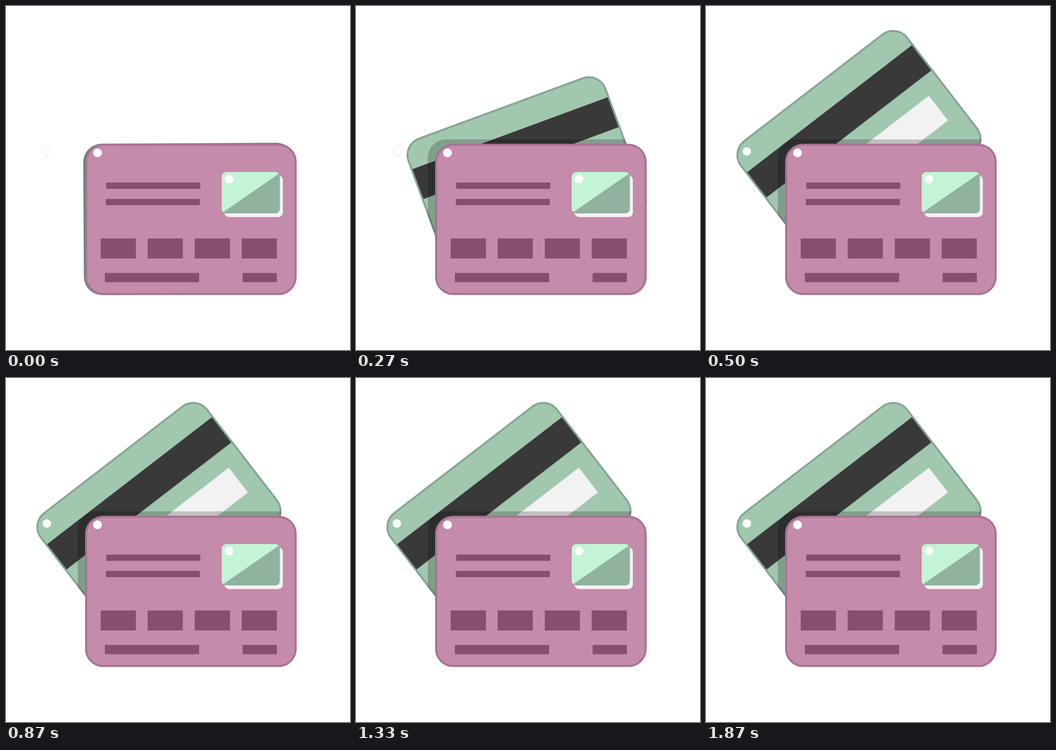
Recreate the animation shown at these times as an HTML page without scripts. Size 748 by 748 pixels, loop 1.91 s.

```html
<!DOCTYPE html>
<html lang="en">
<head>
<meta charset="utf-8">
<title>Cards</title>
<style>
  html, body { margin: 0; width: 100%; height: 100%; overflow: hidden; background: #fff; }
  svg { display: block; width: 100vw; height: 100vh; }
  .swing { animation: swing 1910ms -3.4ms infinite; }
  /* swings out in 15 even steps over 500 ms, then rests */
  @keyframes swing {
    0% {
      transform: translate(230.9px, 493.9px) rotate(-.31deg);
      animation-timing-function: steps(15, end);
    }
    26.178%, 100% { transform: translate(217.8px, 432.9px) rotate(-37.63deg); }
  }
  .dot { fill: #fff; }
  .ink { fill: #864f6d; }
  .pale { fill: #f2f2f2; }
</style>
</head>
<body>
<svg viewBox="0 0 748 748">
  <defs>
    <clipPath id="backShape">
      <rect class="swing" x="-62" y="-194.5" width="460" height="329" rx="40"/>
    </clipPath>
  </defs>

  <circle cx="88.8" cy="316.3" r="9" fill="none" stroke="#c795ae"/>

  <!-- back card, drawn around its pivot -->
  <g class="swing">
    <rect x="-60" y="-192.5" width="456" height="325" rx="38" fill="#a1c7ae" stroke="#84a391" stroke-width="4"/>
    <rect x="-58" y="-135" width="452" height="69.3" fill="#393939"/>
    <rect class="pale" x="108" y="-25.5" width="248.6" height="68"/>
  </g>
  <g clip-path="url(#backShape)">
    <rect x="156" y="290" width="484" height="350" rx="40" opacity=".2"/>
  </g>
  <circle class="dot" cx="88.8" cy="316.3" r="9.2"/>

  <!-- front card -->
  <rect x="174.2" y="301.7" width="455.6" height="324.6" rx="37" fill="#c48bab" stroke="#a87393" stroke-width="4.4"/>
  <circle class="dot" cx="199" cy="319.2" r="9.5"/>
  <g class="ink">
    <rect x="218" y="384" width="204.5" height="13.5"/>
    <rect x="217" y="419.5" width="204.5" height="13.5"/>
    <rect x="206" y="505.5" width="76.4" height="43.5"/>
    <rect x="308" y="505.5" width="76.4" height="43.5"/>
    <rect x="410.5" y="505.5" width="76.4" height="43.5"/>
    <rect x="512.5" y="505.5" width="76.4" height="43.5"/>
    <rect x="215" y="580.5" width="205" height="20"/>
    <rect x="514.5" y="580.5" width="74.5" height="20"/>
  </g>

  <!-- chip -->
  <rect class="pale" x="475" y="368" width="127" height="91" rx="10"/>
  <rect x="469" y="361" width="126.5" height="90" rx="10" fill="#c3f4d6"/>
  <path d="M472 448.5L593.8 364.3Q595.5 367 595.5 371V441a10 10 0 0 1-10 10H479Q475 451 472 448.5Z" fill="#91b29f"/>
  <circle class="dot" cx="485" cy="376.6" r="9.5"/>
</svg>
</body>
</html>
```
